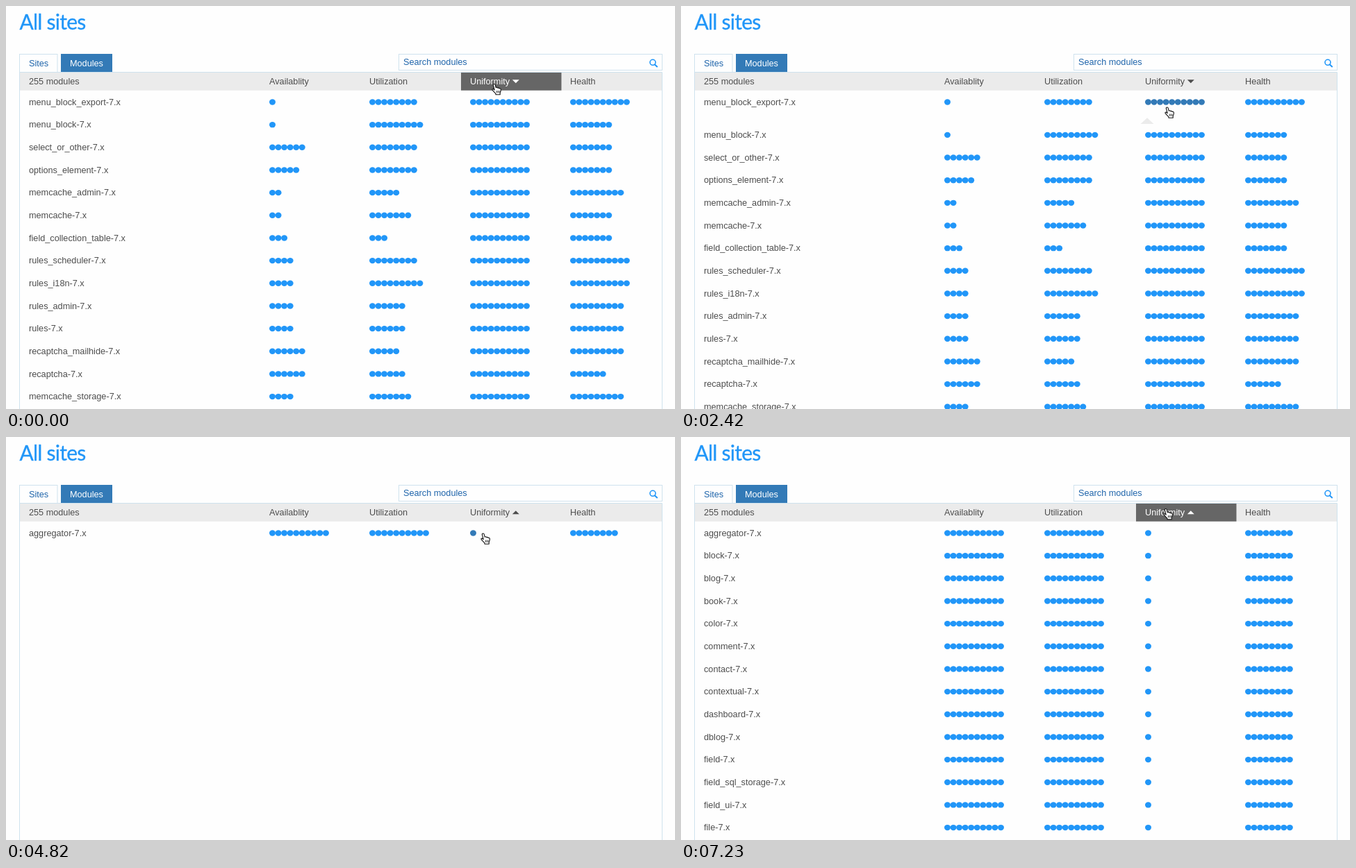
An HTML page that plays this animation: 963 by 581 pixels, repeating every 7950 ms.

```html
<!DOCTYPE html>
<html lang="en">
<head>
<meta charset="utf-8">
<title>All sites</title>
<style>
html, body { margin: 0; width: 100%; height: 100%; overflow: hidden; background: #fefefe; }
svg { display: block; width: 963px; height: 581px; }
text { font-family: "Liberation Sans", Arial, sans-serif; font-size: 12.7px; fill: #4d4d4d; white-space: pre; }
.bold { font-weight: 700; }
.title { font: 30px Lato, sans-serif; letter-spacing: -.75px; fill: #2196f8; stroke: #2196f8; stroke-width: .35px; }
</style>
</head>
<body>
<svg id="stage" viewBox="0 0 963 581" xmlns="http://www.w3.org/2000/svg"></svg>
<script>
const LOOP = 7950, PITCH = 32.66, SECTION = 69.87, LINE = 18.14;
const BLUE = '#2196f8', DARK = '#337ab7', LINK = '#1f65ab', GREY = '#ebebeb', EDGE = '#cfe2ee';
const COLS = [379, 523, 668, 812];
const HEADS = ['Availablity', 'Utilization', 'Uniformity', 'Health'];

// name, then dots for availability, utilization, health
const uniform = [
  ['menu_block_export', 1, 8, 10], ['menu_block', 1, 9, 7], ['select_or_other', 6, 8, 7],
  ['options_element', 5, 8, 7], ['memcache_admin', 2, 5, 9], ['memcache', 2, 7, 7],
  ['field_collection_table', 3, 3, 7], ['rules_scheduler', 4, 8, 10], ['rules_i18n', 4, 9, 10],
  ['rules_admin', 4, 6, 9], ['rules', 4, 6, 9], ['recaptcha_mailhide', 6, 5, 9],
  ['recaptcha', 6, 6, 6], ['memcache_storage', 4, 7, 9]
].map(([name, a, u, h]) => [name, a, u, 10, h]);

const varied = ('aggregator block blog book color comment contact contextual dashboard dblog ' +
  'field field_sql_storage field_ui file').split(' ').map(name => [name, 10, 10, 1, 8]);

const uniformPanel = {
  head: '1 versions on your sites',
  parts: [['12 sites using version 7.x-2.4',
    'https://yellowweddings.org/,  https://awesomehiking.org/,  https://proudhiking.org/brand,  https://redcollege.org/jobs,  http://awesomeagency.net/,',
    'http://proudsports.org/,  http://naturaltourism.org/,  https://bigramen.com/,  https://ecoeats.org/data,  https://redcollege.org/,',
    'http://proudhiking.org/,  https://redcollege.org/brand']]
};
const variedPanel = {
  head: '29 versions on your sites',
  parts: [
    ['2 sites using version 7.17', 'http://proudsports.org/,  https://yellowweddings.org/'],
    ['1 sites using version 7.14', 'https://ecoeats.org/data'],
    ['2 sites using version 7.30', 'https://redcollege.org/jobs,  http://naturaltourism.org/'],
    ['2 sites using version 7.33', 'http://awesomeagency.net/,  https://bigramen.com/'],
    ['3 sites using version 7.19', 'https://awesomehiking.org/,  https://proudhiking.org/brand,  https://redcollege.org/'],
    ['2 sites using version 7.6', '']
  ]
};

// start, end, steps, target of the pointer tip
const START = [703, 112.5];
const MOVES = [
  [540, 750, 4, [700, 146]],
  [2740, 2890, 3, [701, 116.5]],
  [4060, 4220, 4, [687, 139]],
  [7150, 7230, 2, [698, 103.5]]
];

const rect = (x, y, w, h, fill, stroke = 'none') =>
  `<rect x="${x}" y="${y}" width="${w}" height="${h}" fill="${fill}" stroke="${stroke}"/>`;
const path = (d, fill, extra = '') => `<path d="${d}" fill="${fill}" ${extra}/>`;
const label = (x, mid, str, fill = '#4d4d4d', cls = '') =>
  `<text x="${x}" y="${mid + 4.4}" class="${cls}" style="fill:${fill}">${str}</text>`;

function dots(x, y, n, fill) {
  let out = '';
  for (let i = 0; i < n; i++)
    out += `<ellipse cx="${(x + 4.5 + i * 8.55).toFixed(2)}" cy="${y.toFixed(2)}" rx="4.5" ry="4.2" fill="${fill}"/>`;
  return out;
}

function chrome(hover, up) {
  let out = '<text class="title" x="19.5" y="33.5">All sites</text>';
  out += rect(19.5, 69.5, 54.5, 26, '#fefefe', EDGE) + label(33, 83, 'Sites', LINK);
  out += rect(79, 69, 74, 26.5, DARK) + label(92, 83, 'Modules', '#fff');
  out += rect(565.5, 69.5, 379, 23, '#fefefe', EDGE) + label(572, 81, 'Search modules', LINK);
  out += `<circle cx="931" cy="81.3" r="4" fill="none" stroke="${BLUE}" stroke-width="1.6"/>`;
  out += path('M934 84.4L937.2 87.4', 'none', `stroke="${BLUE}" stroke-width="2" stroke-linecap="round"`);
  out += path('M19.5 581V95.5H944.5V581', 'none', `stroke="${EDGE}"`);
  out += rect(20, 96, 924, 25.7, GREY) + label(33, 109, '255 modules');
  if (hover) out += rect(655, 96, 144.5, 25.7, '#666');
  const ink = hover ? '#fff' : '#4d4d4d';
  HEADS.forEach((h, i) => out += label(COLS[i], 109, h, i === 2 ? ink : '#4d4d4d'));
  return out + path(up ? 'M728.8 111.3H738.8L733.8 106.3Z' : 'M728.8 106.3H738.8L733.8 111.3Z', ink);
}

function table(rows, shift, hover) {
  let out = '';
  rows.forEach((row, i) => {
    const y = 138.5 + i * PITCH + (i ? shift : 0);
    if (y > 592) return;
    out += label(33, y - .2, row[0] + '-7.x');
    COLS.forEach((x, c) => out += dots(x, y, row[c + 1], hover && !i && c === 2 ? DARK : BLUE));
  });
  return out;
}

function panel({ head, parts }) {
  let y = 208.2;
  let out = rect(20, 169.7, 924, 38.5, GREY) + label(33, 189, head, '#4d4d4d', 'bold');
  parts.forEach(([title, ...lines], i) => {
    const h = SECTION + (lines.length - 1) * LINE;
    out += rect(20, y, 924, h, i % 2 ? GREY : '#f5f5f5') + label(33, y + 19, title, '#4d4d4d', 'bold');
    lines.forEach((line, k) => out += label(33, y + 47 + k * LINE, line));
    y += h;
  });
  return out;
}

function hand([x, y]) {
  const shape = 'M-1.7 1.4C-1.7-.4.8-.6 1.2 1.2L2.2 5.2C3 4.4 4.4 4.7 4.7 5.7C5.6 5.1 6.8 5.4 7.1 6.5' +
    'C8.2 6 9.3 6.6 9.4 7.8C9.5 10 8.9 11.2 8.2 12.6V15.3H2V14C1 12.4-1 11.2-2.8 8.6C-3.6 7.3-2 6.4-.6 7.9L.2 8.6Z';
  return `<g transform="translate(${x.toFixed(1)} ${y.toFixed(1)})" stroke="#111" stroke-linejoin="round">` +
    path(shape, '#fff', 'stroke-width="1.1"') +
    path('M3.4 9.6V12.8M5.2 9.6V12.8M7 9.6V12.8', 'none', 'stroke-width=".8"') + '</g>';
}

function pointer(t) {
  let pos = START;
  for (const [from, to, n, end] of MOVES) {
    if (t < from) break;
    const f = Math.min(n, 1 + Math.floor((t - from) / (to - from) * (n - 1) + 1e-6)) / n;
    pos = pos.map((v, i) => v + (end[i] - v) * f);
  }
  return pos;
}

function phase(t, gap, open, closing, closed) {
  if (t < gap || t >= closed) return 'shut';
  return t < open ? 'gap' : t < closing ? 'open' : 'closing';
}

function draw(t) {
  const second = t >= 3610;
  const state = second ? phase(t, 4820, 4880, 6430, 6520) : phase(t, 1230, 1280, 2420, 2470);
  const tip = pointer(t);
  const onHead = tip[1] < 122;
  const shift = { shut: 0, closing: 14.7 }[state] ?? (second ? 600 : 160);
  let out = rect(0, 0, 963, 581, '#fefefe') + chrome(onHead, t >= 3670);
  out += table(second ? varied : uniform, shift, !onHead);
  if (state === 'open') out += panel(second ? variedPanel : uniformPanel);
  if (state === 'open' || state === 'closing') out += path('M661.5 170L671 161.3L680.5 170Z', GREY);
  return out + hand(tip);
}

const stage = document.getElementById('stage');
let last = '';
function tick() {
  const next = draw(performance.now() % LOOP);
  if (next !== last) stage.innerHTML = last = next;
  requestAnimationFrame(tick);
}
tick();
</script>
</body>
</html>
```
